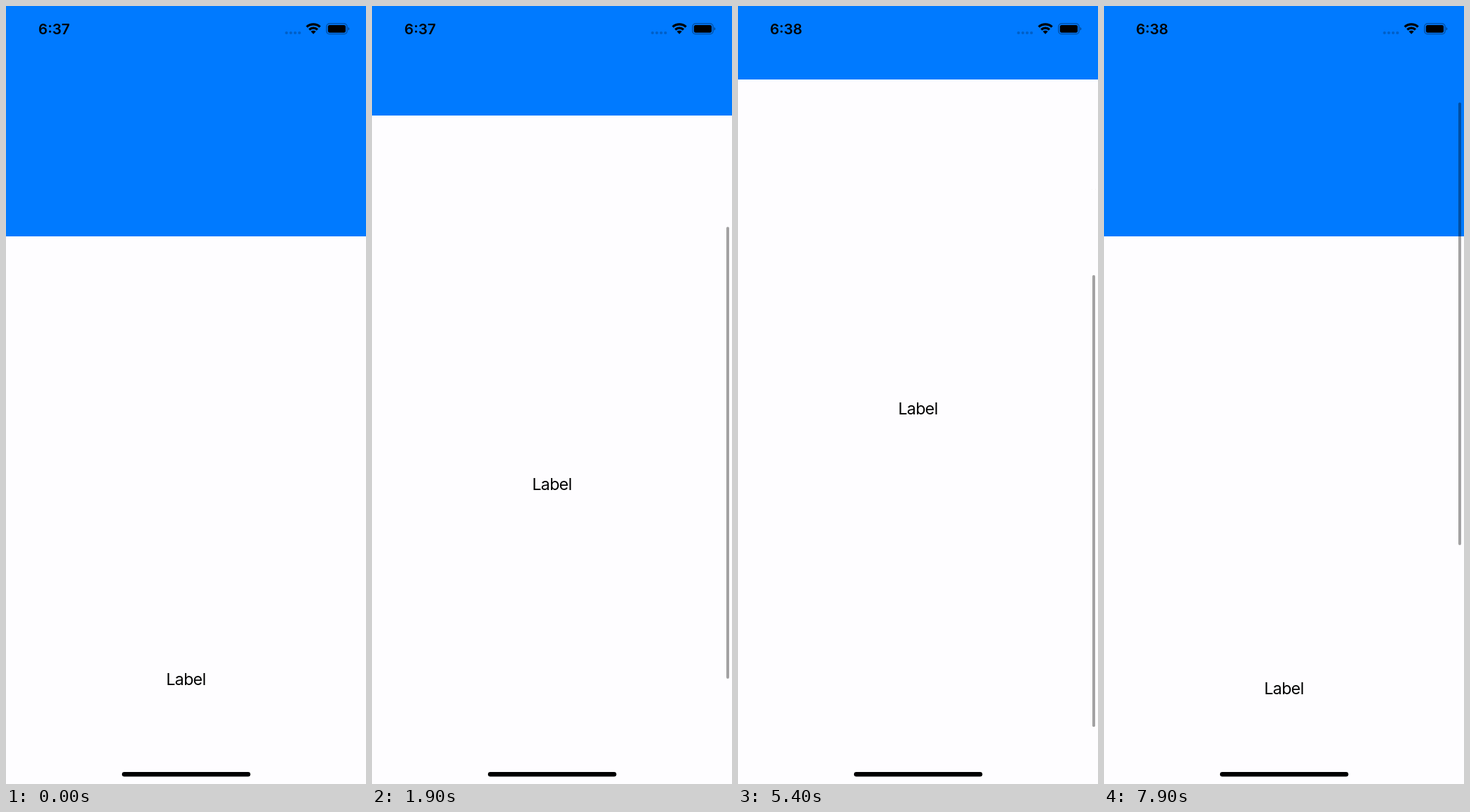
An HTML page for the animation above (8000 ms loop, 509 by 1101 pixels).

```html
<!DOCTYPE html>
<html lang="en">
<head>
<meta charset="utf-8">
<title>Collapsing header</title>
<style>
  html, body { margin: 0; width: 100%; height: 100%; overflow: hidden; background: #fefdff; }
  svg { display: block; width: 100vw; height: 100vh; }
  text { font-family: Inter, "Liberation Sans", sans-serif; text-anchor: middle; }
</style>
</head>
<body>
<svg viewBox="0 0 509 1101">
  <rect width="509" height="1101" fill="#fefdff"/>
  <text id="label" x="254.4" font-size="23" letter-spacing="-0.6">Label</text>
  <rect id="header" width="509" fill="#007aff"/>
  <rect id="bar" x="501" width="4" rx="2" fill-opacity=".36"/>

  <text id="clock" x="68" y="39.8" font-size="20.4" font-weight="600">6:37</text>
  <g fill-opacity=".22">
    <circle cx="396.6" cy="38" r="2.1"/>
    <circle cx="402.7" cy="38" r="2.1"/>
    <circle cx="408.8" cy="38" r="2.1"/>
    <circle cx="414.9" cy="38" r="2.1"/>
  </g>
  <g transform="translate(434.6 39.7)">
    <path d="M-9.4-10.1A13.8 13.8 0 0 1 9.4-10.1M-5.8-6.2A8.5 8.5 0 0 1 5.8-6.2" fill="none" stroke="#000" stroke-width="3.3"/>
    <path d="M0 0L-3.5-3.6A5 5 0 0 1 3.5-3.6Z"/>
  </g>
  <rect x="453.2" y="24.9" width="29" height="14.8" rx="4.3" fill="none" stroke="#000" stroke-opacity=".38" stroke-width="1.3"/>
  <rect x="455.2" y="26.9" width="25" height="10.8" rx="2.3"/>
  <path d="M483.6 29.8Q485.4 30.4 485.4 32.3T483.6 34.8Z" fill-opacity=".42"/>

  <rect x="164" y="1084" width="181.5" height="6.4" rx="3.2"/>
</svg>
<script>
const LOOP = 8000, STEP = 100;
const TOP = 953, BOTTOM = 534.5;      // label centre at the two scroll limits
const BAR_TOP = 136.4, BAR_LEN = 639.5, BAR_RATE = 0.638;

// [time, label centre]
const path = [
  [0, 953], [400, 953], [900, 855], [1300, 763.5],
  [1600, 716], [1900, 677], [2100, 677], [2400, 633], [2700, 594],
  [3200, 594], [3600, 538], [3800, 508], [4100, 508],
  [4200, 512], [4400, 524], [4600, 531.5], [4800, 534.5],
  [5300, 534.5], [5400, 570], [6100, 760], [6200, 766],
  [6900, 839], [7100, 857], [7500, 933.5], [7600, 933.5], [7900, 966]
];

const $ = id => document.getElementById(id);
const clamp = (v, lo, hi) => Math.min(hi, Math.max(lo, v));
const set = (el, attrs) => { for (const k in attrs) el.setAttribute(k, attrs[k]); };

function position(t) {
  const i = path.findIndex(p => p[0] > t);
  if (i < 0) return path[path.length - 1][1];
  const [t0, y0] = path[i - 1], [t1, y1] = path[i];
  return y0 + (y1 - y0) * (t - t0) / (t1 - t0);
}

function draw(t) {
  const y = position(t);
  const inside = clamp(y, BOTTOM, TOP);
  const overTop = Math.max(0, y - TOP);
  const overBottom = Math.max(0, BOTTOM - y);

  set($('label'), { y: y + 8.3 });
  set($('header'), { height: clamp(Math.round(y - 522.3), 104, 326) });
  // The bar shortens against its end while the list is pulled past a limit.
  set($('bar'), {
    y: BAR_TOP + (TOP - inside) * BAR_RATE + overBottom,
    height: BAR_LEN - overTop - overBottom,
    visibility: t < 500 ? 'hidden' : 'visible'
  });
  $('clock').textContent = t < 4500 ? '6:37' : '6:38';
}

const start = performance.now();
function tick() {
  const t = (performance.now() - start) % LOOP;
  draw(Math.floor(t / STEP) * STEP);
  requestAnimationFrame(tick);
}
tick();
</script>
</body>
</html>
```
